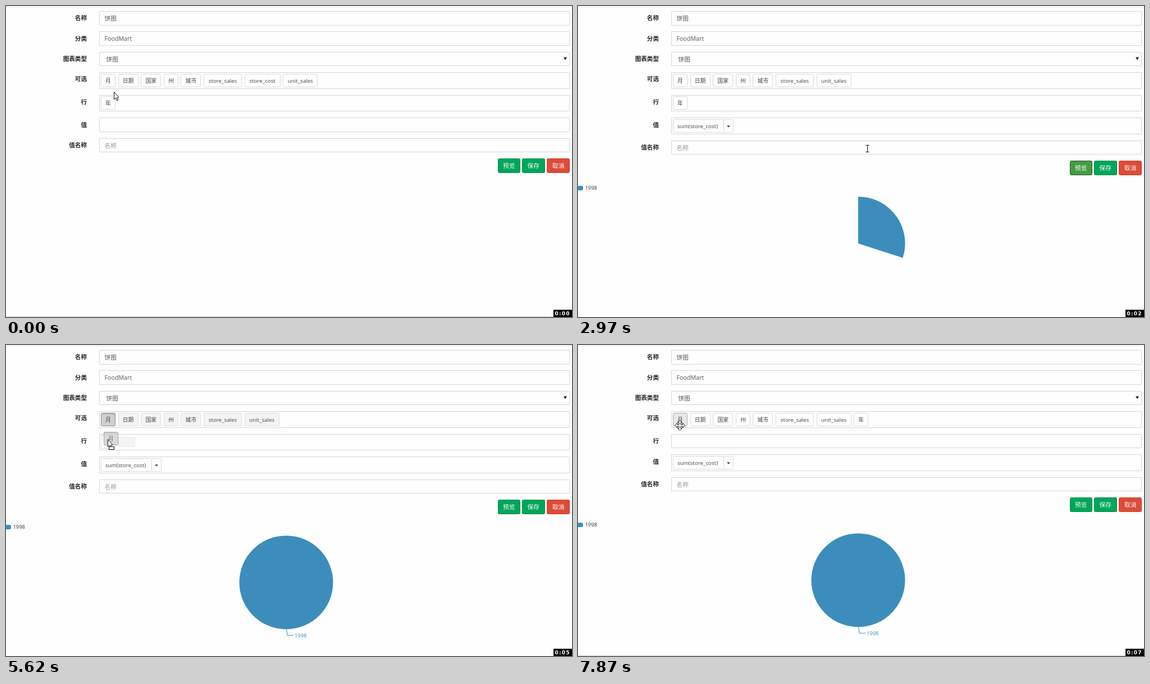
An HTML page with a canvas for the animation above (8000 ms loop, 1008 px wide and 555 px high).

```html
<!DOCTYPE html>
<html lang="zh-CN">
<head>
<meta charset="utf-8">
<style>
  html, body { margin: 0; width: 100%; height: 100%; overflow: hidden; background: #fefefe; }
  canvas { display: block; }
</style>
</head>
<body>
<canvas id="stage" width="1008" height="555"></canvas>
<script>
const ctx = document.getElementById('stage').getContext('2d');
const LOOP = 8000;
const FONT = '"Open Sans", "Noto Sans CJK SC", "Noto Sans CJK", sans-serif';
const BLUE = '#3c8dbc', BORDER = '#d2d6de', GAP = 4.6, CHIP_H = 24;
const FIELDS = ['月', '日期', '国家', '州', '城市', 'store_sales', 'store_cost', 'unit_sales'];
const WIDTHS = { store_sales: 68, store_cost: 64, unit_sales: 62 };

// Screen updates come in bursts: [first, last, count]
const BURSTS = [[0, 0, 1], [150, 1050, 8], [1200, 1510, 3], [1780, 2420, 6], [2850, 2970, 2],
  [3070, 3890, 7], [4040, 4660, 5], [5250, 5740, 5], [6170, 6390, 3], [6660, 7090, 4], [7370, 7870, 5]];
const STEPS = BURSTS.flatMap(([a, b, n]) =>
  Array.from({ length: n }, (_, i) => n > 1 ? Math.round(a + (b - a) * i / (n - 1)) : a));

// Pointer path: [time, x, y]
const PATH = [[0, 192, 153], [650, 430, 150], [800, 449, 138], [1050, 449, 137], [1200, 451, 166],
  [1510, 443, 222], [1780, 442, 222], [2420, 893, 289], [2850, 800, 282], [2970, 515, 254],
  [3890, 250, 196], [4660, 176, 134], [5250, 177, 138], [5740, 182, 178], [6170, 184, 176],
  [6660, 186, 183], [7090, 190, 194], [7370, 186, 177], [7870, 181, 143]];

const DRAGS = [
  { name: 'store_cost', start: 1200, end: 1780, grab: [449.4, 154] },
  { name: '月', start: 5250, end: 6170, grab: [176, 134] },
  { name: '年', start: 7370, end: 7870, grab: [186, 178] },
];

const STYLES = {
  plain: ['#fefefe', '#d8d9de'], grey: ['#f4f4f4', '#ddd'],
  hover: ['#e7e7e7', '#adadad'], pressed: ['#d0d0d0', '#8c8c8c'],
};

const chipWidth = name => WIDTHS[name] || 16 + 10 * name.length;

function pointerAt(t) {
  const i = PATH.findIndex(p => p[0] > t);
  if (i < 0) return PATH[PATH.length - 1].slice(1);
  const [t0, x0, y0] = PATH[i - 1], [t1, x1, y1] = PATH[i];
  const k = (t - t0) / (t1 - t0);
  return [x0 + (x1 - x0) * k, y0 + (y1 - y0) * k];
}

function text(str, x, y, size, color, align = 'left', weight = 400) {
  ctx.font = `${weight} ${size}px ${FONT}`;
  ctx.textAlign = align;
  ctx.textBaseline = 'alphabetic';
  ctx.fillStyle = color;
  ctx.fillText(str, x, y + size * 0.37);
}

function box(x, y, w, h, fill, stroke, radius = 0) {
  const left = Math.round(x), top = Math.round(y);
  ctx.beginPath();
  ctx.roundRect(left + .5, top + .5, Math.round(x + w) - left - 1, Math.round(y + h) - top - 1, radius);
  ctx.fillStyle = fill;
  ctx.fill();
  ctx.strokeStyle = stroke;
  ctx.lineWidth = 1;
  ctx.stroke();
}

function polygon(points, fill, stroke) {
  ctx.beginPath();
  points.forEach(p => ctx.lineTo(...p));
  ctx.closePath();
  ctx.fillStyle = fill;
  ctx.fill();
  if (!stroke) return;
  ctx.strokeStyle = stroke;
  ctx.lineWidth = 1;
  ctx.stroke();
}

function triangle(x, y, half, height) {
  polygon([[x - half, y], [x + half, y], [x, y + height]], '#222');
}

function formRow(label, y, h, value, color = '#555', indent = 0) {
  text(label, 144, y + 12.5, 10.6, '#222', 'right', 700);
  box(166, y, 838, h, '#fefefe', BORDER);
  if (value) text(value, 175.5 + indent, y + 13, 10.7, color);
}

function chip(name, x, y, style) {
  const w = chipWidth(name);
  box(x, y, w, CHIP_H, ...STYLES[style], 2);
  if (style === 'pressed') {
    const shade = ctx.createLinearGradient(0, y, 0, y + 5);
    shade.addColorStop(0, 'rgba(0,0,0,.15)');
    shade.addColorStop(1, 'rgba(0,0,0,0)');
    ctx.fillStyle = shade;
    ctx.fillRect(Math.round(x) + 1, Math.round(y) + 1, Math.round(w) - 2, 5);
  }
  text(name, x + w / 2, y + 12.4, 9.8, '#444', 'center');
}

// Lays out a row of chips, with the drop slot after the dragged chip or at the end
function chipRow(names, y, { drag, hasSlot, pointer, grey }) {
  const slotAfter = drag && names.includes(drag.name) ? drag.name : names[names.length - 1];
  let x = 169, shifted = false, hovered = false;
  for (const name of names) {
    const w = chipWidth(name);
    const over = !drag && pointer[0] >= x && pointer[0] < x + w && pointer[1] >= y && pointer[1] < y + CHIP_H;
    const held = drag && drag.name === name;
    if (held) drag.home = [x, y];
    hovered ||= over;
    chip(name, x, y, held ? 'pressed' : over ? 'hover' : shifted || grey ? 'grey' : 'plain');
    x += w + GAP;
    if (hasSlot && name === slotAfter) {
      const slotW = chipWidth(drag.name) + 4.4;
      ctx.setLineDash([3, 2]);
      box(x, y + 3, slotW, 18, '#f4f4f4', '#ddd');
      ctx.setLineDash([]);
      x += slotW + GAP;
      shifted = true;
    }
  }
  return hovered;
}

function button(label, x, w, y, fill, stroke) {
  box(x, y, w, 26, fill, stroke, 2);
  text(label, x + w / 2, y + 13, 10.7, '#fff', 'center', 500);
}

function pie(t, y) {
  box(-1, y, 10, 8, BLUE, BLUE, 2);
  text('1998', 12.5, y + 4, 9.3, '#333');

  const cx = 499, cy = y + 103, r = 83.5;
  const progress = Math.min(1, Math.max(0, (t - 2858) / 1000));
  const sweep = 2 * Math.PI * (1 - (1 - progress) ** 3);
  ctx.save();
  ctx.beginPath();
  ctx.moveTo(cx, cy);
  ctx.arc(cx, cy, 500, -Math.PI / 2, sweep - Math.PI / 2);
  ctx.clip();
  ctx.beginPath();
  ctx.arc(cx, cy, r, 0, 2 * Math.PI);
  ctx.fillStyle = BLUE;
  ctx.fill();
  ctx.beginPath();
  ctx.moveTo(cx + .5, cy + r);
  ctx.lineTo(cx + 2, cy + 94.5);
  ctx.lineTo(cx + 13, cy + 94.5);
  ctx.strokeStyle = BLUE;
  ctx.lineWidth = 1;
  ctx.stroke();
  text('1998', cx + 15, cy + 95, 9.3, BLUE);
  ctx.restore();
}

function cursor(kind, [x, y]) {
  ctx.save();
  ctx.translate(Math.round(x) + .5, Math.round(y) + .5);
  if (kind === 'move') {
    const arm = [[-1.5, -1.5], [-1.5, -5], [-4, -5], [0, -9], [4, -5], [1.5, -5]];
    const turns = [[1, 0], [0, 1], [-1, 0], [0, -1]];
    polygon(turns.flatMap(([c, s]) => arm.map(([px, py]) => [px * c - py * s, px * s + py * c])), '#fff', '#111');
  } else if (kind === 'text') {
    ctx.fillStyle = '#111';
    ctx.fillRect(-.5, -6, 1, 12);
    ctx.fillRect(-3, -6.5, 6, 1);
    ctx.fillRect(-3, 5.5, 6, 1);
  } else {
    polygon([[0, 0], [0, 13], [3, 10.5], [5, 15.5], [7, 14.5], [5, 10], [8.5, 9.5]], '#fff', '#111');
    if (kind === 'drag') {
      ctx.fillStyle = '#fff';
      ctx.fillRect(2, 13, 9, 5);
      ctx.strokeRect(2, 13, 9, 5);
    }
  }
  ctx.restore();
}

function clock(t) {
  ctx.fillStyle = '#000';
  ctx.fillRect(975, 542, 33, 13);
  ctx.font = 'bold 9px "DejaVu Sans", sans-serif';
  ctx.letterSpacing = '1.2px';
  ctx.textAlign = 'left';
  ctx.fillStyle = '#fff';
  ctx.fillText('0:0' + Math.floor(t / 1013), 977.5, 551.5);
  ctx.letterSpacing = '0px';
}

function draw(t) {
  const pointer = pointerAt(t);
  const drag = DRAGS.find(d => t >= d.start && t < d.end);
  const hasSum = t >= 1780, yearMoved = t >= 7870;
  const available = FIELDS.filter(name => !hasSum || name !== 'store_cost');
  if (yearMoved) available.push('年');
  const rowNames = yearMoved ? [] : ['年'];

  const heightOf = filled => filled ? 29.6 : 25.6;
  const rowY = 158.6, rowH = heightOf(!yearMoved);
  const sumY = rowY + rowH + 10.9, sumH = heightOf(hasSum);
  const nameY = sumY + sumH + 10.9, buttonY = nameY + 36.5;

  ctx.fillStyle = '#fefefe';
  ctx.fillRect(0, 0, 1008, 555);
  ctx.fillStyle = '#e8e8e8';
  ctx.fillRect(0, 1, 1008, 1);
  if (!hasSum || yearMoved) {
    ctx.fillStyle = '#d0d0d0';
    ctx.fillRect(0, 554, 1008, 1);
  }

  formRow('名称', 9, 25.6, '饼图');
  formRow('分类', 45.4, 25.6, 'FoodMart');
  formRow('图表类型', 81.8, 25.6, '饼图', '#555', 3);
  triangle(996, 91.5, 3, 5);
  formRow('可选', 118, 29.6);
  formRow('行', rowY, rowH);
  formRow('值', sumY, sumH);
  formRow('值名称', nameY, 25.6, '名称', '#999');

  if (hasSum) {
    const y = sumY + 2.8;
    box(169, y, 91, CHIP_H, ...STYLES.plain, 2);
    box(259, y, 18, CHIP_H, ...STYLES.plain, 2);
    text('sum(store_cost)', 177, y + 12.4, 9.8, '#444');
    triangle(268, y + 11.5, 2.8, 3);
  }

  const ghostY = drag ? pointer[1] - drag.grab[1] + (drag.name === '年' ? 161 : 121) : 0;
  const slotOnTop = ghostY + CHIP_H / 2 < 153;
  const overTop = chipRow(available, 121,
    { drag, pointer, hasSlot: drag && slotOnTop, grey: t >= 5250 && t < 7870 });
  const overRow = chipRow(rowNames, rowY + 2.8, { drag, pointer, hasSlot: drag && !slotOnTop });
  if (t === 1050) chip('store_cost', 424.6, 121, 'pressed');

  const previewColors = t >= 2850 && t < 5250 ? ['#449d44', '#255625']
    : t === 2420 ? ['#008d4c', '#008d4c'] : ['#00a65a', '#008d4c'];
  button('预览', 875.5, 40.5, buttonY, ...previewColors);
  button('保存', 919, 40.5, buttonY, '#00a65a', '#008d4c');
  button('取消', 963.4, 40.5, buttonY, '#dd4b39', '#d73925');

  if (t >= 2850) pie(t, buttonY + 44.6);

  if (drag) {
    ctx.globalAlpha = .75;
    chip(drag.name, drag.home[0] + pointer[0] - drag.grab[0], ghostY, 'pressed');
    ctx.globalAlpha = 1;
  }
  const overText = pointer[0] > 166 && pointer[1] > nameY && pointer[1] < nameY + 25.6;
  cursor(drag ? 'drag' : overTop || overRow ? 'move' : overText ? 'text' : 'arrow', pointer);
  clock(t);
}

function tick() {
  const now = performance.now() % LOOP;
  draw(STEPS.filter(step => step <= now).pop());
  requestAnimationFrame(tick);
}
tick();
</script>
</body>
</html>
```
